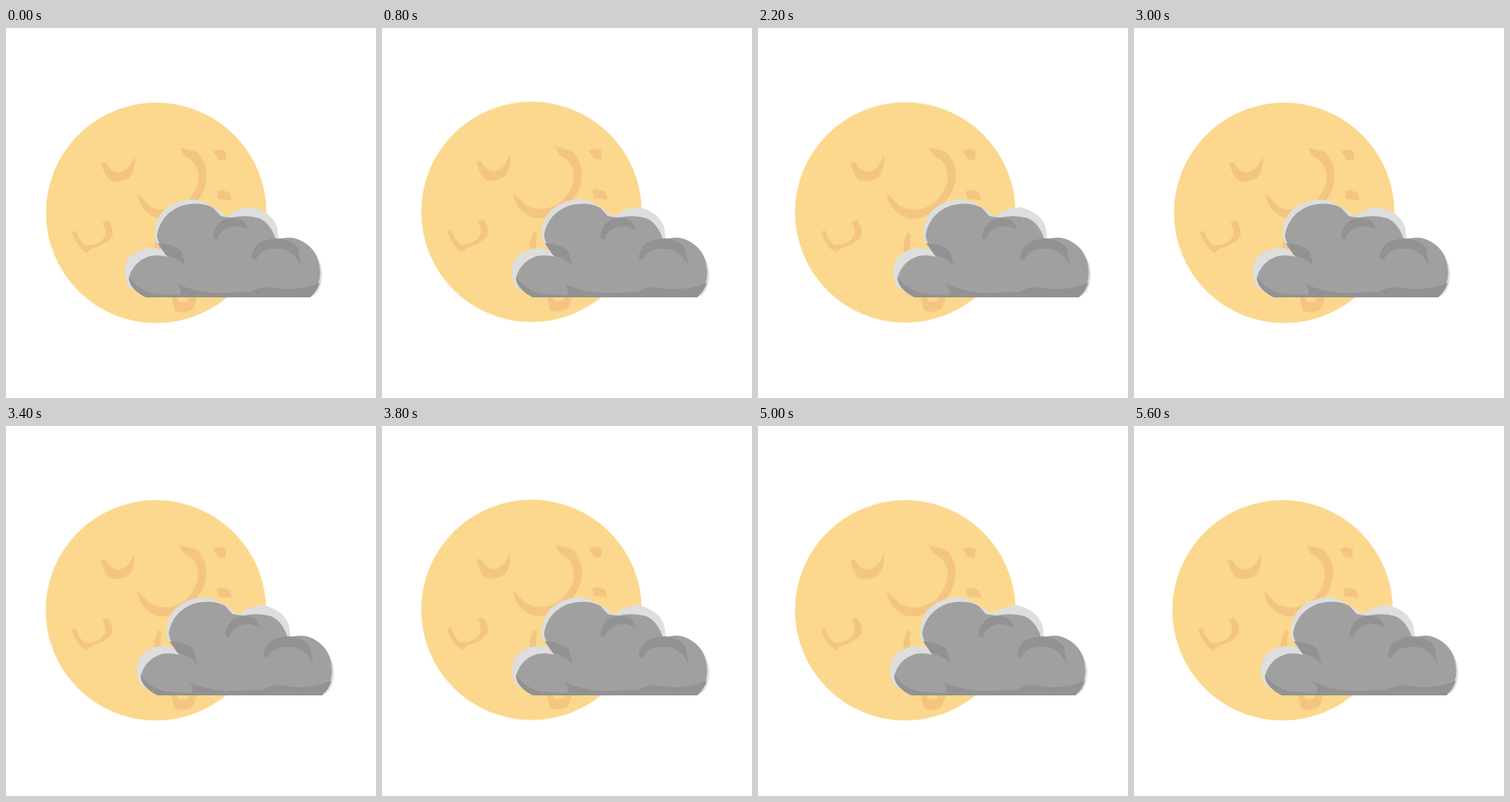
Recreate the animation shown at these times as an HTML page without scripts. Size 500 by 500 pixels, loop 5.81 s.

```html
<!DOCTYPE html>
<html lang="en">
<head>
<meta charset="utf-8">
<title>Moon and cloud</title>
<style>
html, body { margin: 0; width: 100%; height: 100%; overflow: hidden; background: #fff; }
svg { display: block; width: 100%; height: 100%; }
.moon { fill: #fbd88d; animation: sway 5.81s step-end infinite; }
.mark { fill: #f4c580; }
.cloud { fill: #a0a0a0; animation: drift 5.81s step-end infinite; }
.rim { fill: #dedede; }
.shade { fill: #929292; }

/* A 3 s cycle of 200 ms poses; the second pass is cut one pose short. */
@keyframes drift {
  0%, 51.635% { transform: translateX(0); }
  3.442%, 55.077% { transform: translateX(8px); }
  6.884%, 58.519% { transform: translateX(16px); }
  10.327%, 61.962% { transform: translateX(21.5px); }
  13.769%, 65.404% { transform: translateX(15px); }
  17.211%, 68.846% { transform: translateX(9px); }
  20.654%, 72.289% { transform: translateX(4px); }
  24.096%, 75.731% { transform: translateX(1px); }
  27.538%, 79.173% { transform: translateX(6px); }
  30.981%, 82.616% { transform: translateX(12px); }
  34.423%, 86.058% { transform: translateX(18px); }
  37.865%, 89.500% { transform: translateX(22.5px); }
  41.308%, 92.943% { transform: translateX(17px); }
  44.750%, 96.385% { transform: translateX(11px); }
  48.192% { transform: translateX(5px); }
}
@keyframes sway {
  0%, 51.635% { transform: translate(0, 0); }
  3.442%, 55.077% { transform: translate(-.2px, -.4px); }
  6.884%, 58.519% { transform: translate(-.5px, -.8px); }
  10.327%, 61.962% { transform: translate(-.7px, -1.1px); }
  13.769%, 65.404% { transform: translate(-1px, -1.4px); }
  17.211%, 68.846% { transform: translate(-1.4px, -1.5px); }
  20.654%, 72.289% { transform: translate(-1.8px, -1.5px); }
  24.096%, 75.731% { transform: translate(-2.3px, -1.5px); }
  27.538%, 79.173% { transform: translate(-3px, -1.3px); }
  30.981%, 82.616% { transform: translate(-3.5px, -1.1px); }
  34.423%, 86.058% { transform: translate(-4px, -.8px); }
  37.865%, 89.500% { transform: translate(-4px, -.6px); }
  41.308%, 92.943% { transform: translate(-3.3px, -.7px); }
  44.750%, 96.385% { transform: translate(-2.3px, -.8px); }
  48.192% { transform: translate(-1.1px, -.4px); }
}
</style>
</head>
<body>
<svg viewBox="0 0 500 500">
  <g class="moon">
    <circle cx="203" cy="249.8" r="149"/>
    <g class="mark">
      <path d="M129 181L135 182Q142 195 153 195Q168 192 174 172Q176 190 167 202Q152 211 140 206Q131 196 129 181Z"/>
      <path d="M89 276L95 274Q98 288 108 294Q126 294 134 281Q136 270 130 263L137 260Q146 268 144 281Q134 294 116 298L109 304Q95 295 89 276Z"/>
      <path d="M235 162L257 167Q273 182 271 204Q267 232 246 243Q230 260 207 258Q181 249 178 224Q187 232 195 241Q210 248 225 245Q246 238 248 230Q262 215 260 198Q258 180 241 173Z"/>
      <path d="M280 167L288 164L298 167L297 179L288 178Z"/>
      <path d="M285 221L291 219L302 222L306 233L287 231Z"/>
      <path d="M206 277L211 279Q208 292 210 302L201 306Q199 290 206 277Z"/>
      <path d="M222 355H258Q258 372 251 381Q240 387 228 382Z"/>
    </g>
    <path d="M229 355H249L246 369Q238 372 233 369Z"/>
  </g>
  <g class="cloud">
    <path class="rim" d="M166 350Q158 335 162 318Q170 301 190 298Q205 295 214 303L208 296Q198 285 202 268Q207 245 230 236Q250 228 265 234L285 245L298 255Q312 243 332 242Q362 250 367 272L368 284L400 289Q424 305 427 328Q428 358 411 364H189Z"/>
    <path d="M189 364Q166 352 166 338Q172 315 195 308Q207 306 217 309L216 300Q204 292 204 279Q210 250 238 240Q262 234 280 243L290 254Q297 256 305 256Q325 252 342 257Q358 264 365 287Q384 279 400 288Q422 300 424 325Q427 345 411 364Z"/>
    <g class="shade">
      <path d="M280 284Q281 265 297 258Q320 253 326 268L328 273Q310 263 296 272Q287 277 286 286Z"/>
      <path d="M332 311Q333 293 350 287Q378 278 395 298L399 322Q392 305 375 299Q352 296 342 306L337 313Z"/>
      <path d="M205 291Q228 292 237 302L243 322Q232 310 216 307Z"/>
      <path d="M189 364Q168 354 166 336Q177 353 200 359L235 361Q239 352 230 345Q250 355 280 358L330 357Q345 348 360 351Q395 357 424 344Q421 355 411 364Z"/>
    </g>
  </g>
</svg>
</body>
</html>
```
